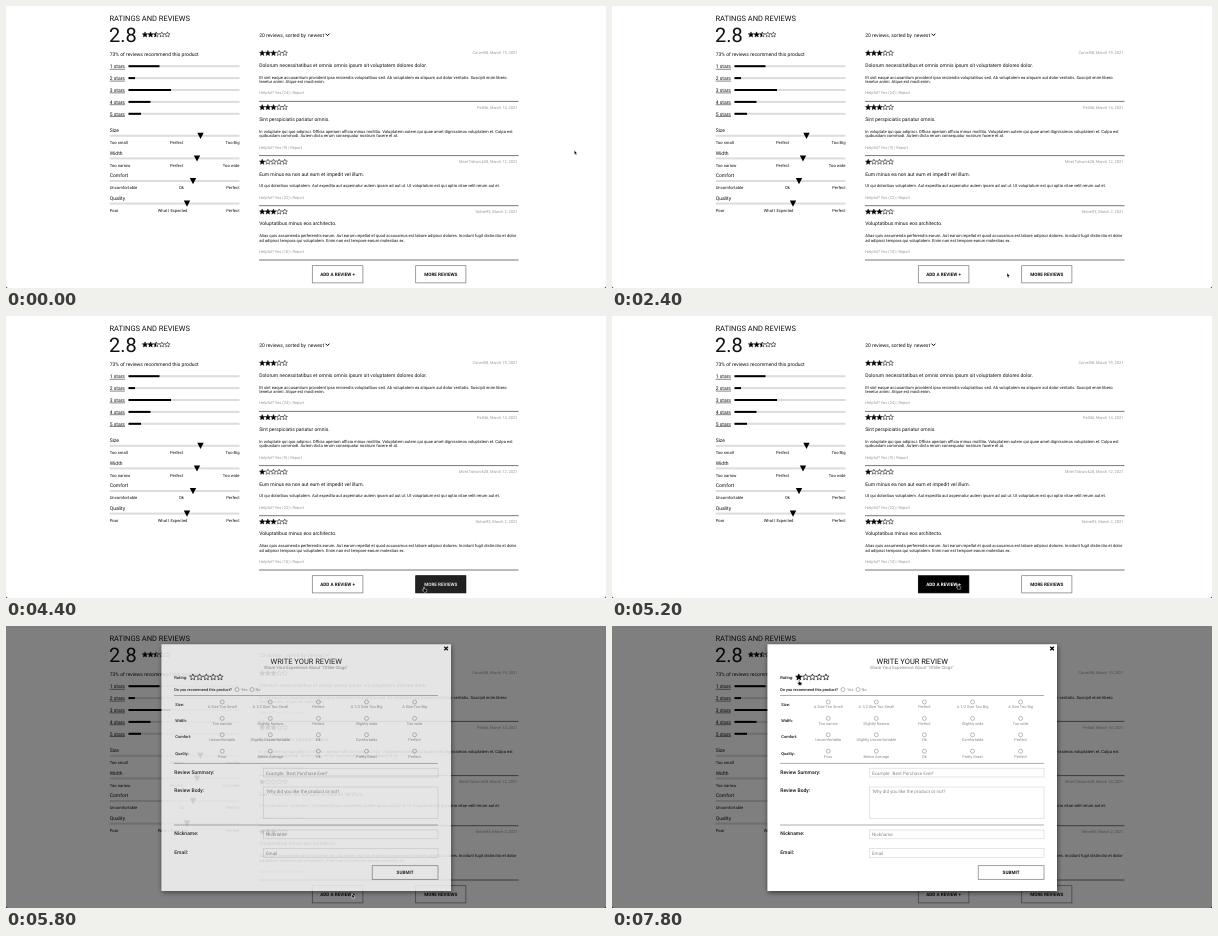
An HTML page that plays this animation: 600x282 px, repeating every 8000 ms.

```html
<!DOCTYPE html>
<html lang="en">
<head>
<meta charset="utf-8">
<title>Ratings and reviews</title>
<style>
html, body { margin: 0; width: 100%; height: 100%; overflow: hidden; background: #fff; }
svg { display: block; width: 100%; height: 100%; }
text { font-family: Roboto, "Liberation Sans", sans-serif; text-rendering: geometricPrecision; white-space: pre; }
</style>
</head>
<body>
<svg id="stage" viewBox="0 0 600 282" xmlns="http://www.w3.org/2000/svg">
  <defs>
    <filter id="shadow" x="-10%" y="-10%" width="120%" height="120%">
      <feDropShadow dx="0.5" dy="1.5" stdDeviation="2.5" flood-color="#000" flood-opacity="0.6"/>
    </filter>
  </defs>
  <g id="page"></g>
  <rect id="dim" width="600" height="282" fill="#000"/>
  <g id="modal"></g>
  <path d="M0 280.3V282H1.7Q.3 281.7 0 280.3ZM600 280.3V282H598.3Q599.7 281.7 600 280.3Z" fill="#111"/>
  <g id="cursor" stroke="#fff" stroke-width=".45" stroke-linejoin="round">
    <path id="arrow" d="M0 0V4.3L1 3.4L1.7 5L2.4 4.7L1.7 3.1H3.1Z"/>
    <path id="hand" d="M-.5 .2Q0 -.4 .5 .2V1.9L2.6 2.4Q3 2.6 2.9 3.2L2.4 5.2H-.1L-1.6 3.3Q-1.7 2.6 -1.1 2.7L-.5 3.2Z"/>
  </g>
</svg>
<script>
const LOOP = 8000, STEP = 200;
const $ = id => document.getElementById(id);
const page = $("page"), modal = $("modal");

function add(parent, tag, attrs, content) {
  const el = document.createElementNS("http://www.w3.org/2000/svg", tag);
  for (const key in attrs) el.setAttribute(key, attrs[key]);
  if (content) el.textContent = content;
  return parent.appendChild(el);
}

const text = (parent, x, y, size, content, extra) =>
  add(parent, "text", { x, y, "font-size": size, fill: "#111", ...extra }, content);
const rect = (parent, x, y, width, height, fill, extra) =>
  add(parent, "rect", { x, y, width, height, fill, ...extra });
const rule = (parent, x1, x2, y, stroke) =>
  add(parent, "line", { x1, x2, y1: y, y2: y, stroke, "stroke-width": 0.8 });

const END = { "text-anchor": "end" };
const MID = { "text-anchor": "middle" };
const SEMI = { "font-weight": 500 };

// Ten corners from the top, clockwise; the last five lie on the left half.
function starPath(cx, cy, r, leftOnly) {
  const points = [];
  for (let i = 0; i < 10; i++) {
    const a = i * Math.PI / 5, d = i % 2 ? r * 0.45 : r;
    if (!leftOnly || i === 0 || i >= 5)
      points.push((cx + d * Math.sin(a)).toFixed(2) + " " + (cy - d * Math.cos(a)).toFixed(2));
  }
  return "M" + points.join("L") + "Z";
}

function stars(parent, x, y, r, gap, score) {
  return [0, 1, 2, 3, 4].map(i => {
    const cx = x + i * gap;
    if (score - i === 0.5) add(parent, "path", { d: starPath(cx, y, r, true), fill: "#000" });
    return add(parent, "path", {
      d: starPath(cx, y, r), fill: score >= i + 1 ? "#000" : "none",
      stroke: "#000", "stroke-width": r > 3 ? 0.65 : 0.5, "stroke-linejoin": "round"
    });
  });
}

function button(parent, x, y, w, h, label) {
  const box = rect(parent, x, y, w, h, "#fff", { stroke: "#777", "stroke-width": 0.7 });
  const caption = text(parent, x + w / 2, y + h / 2 + 1.65, 4.62, label, { ...MID, "font-weight": 700 });
  return level => {
    const shade = Math.round(255 * (1 - level)), ink = Math.round(17 + 238 * level);
    box.setAttribute("fill", `rgb(${shade},${shade},${shade})`);
    box.setAttribute("stroke", level > 0.5 ? "#000" : "#777");
    caption.setAttribute("fill", `rgb(${ink},${ink},${ink})`);
  };
}

function buildSummary() {
  text(page, 103.5, 15.2, 7.5, "RATINGS AND REVIEWS");
  text(page, 103, 35.6, 20, "2.8");
  stars(page, 139, 28.7, 2.8, 5.6, 2.5);
  text(page, 103.7, 49.9, 5, "73% of reviews recommend this product");
  [31, 6.5, 42.5, 22, 12.5].forEach((width, i) => {
    const y = 60.2 + i * 11.9;
    text(page, 103.7, y + 1.7, 5, `${i + 1} stars`, { "text-decoration": "underline" });
    rect(page, 122.5, y - 1, 111, 2, "#dcdcdc");
    rect(page, 122.5, y - 1, width, 2, "#000");
  });
  [
    ["Size", 194.5, "Too small", 164, "Perfect", "Too Big"],
    ["Width", 191, "Too narrow", 164, "Perfect", "Too wide"],
    ["Comfort", 187, "Uncomfortable", 173, "Ok", "Perfect"],
    ["Quality", 181, "Poor", 151.7, "What I Expected", "Perfect"]
  ].forEach(([name, mark, low, midX, mid, high], i) => {
    const y = 129.8 + i * 22.6;
    text(page, 103.7, y - 3.8, 5, name);
    rect(page, 103.7, y - 1, 129.8, 2, "#dcdcdc");
    add(page, "path", { d: `M${mark - 3.2} ${y - 3}h6.4l-3.2 6.2Z`, fill: "#000" });
    text(page, 103.7, y + 8.2, 4.15, low);
    text(page, midX, y + 8.2, 4.15, mid);
    text(page, 233.5, y + 8.2, 4.15, high, END);
  });
}

const reviews = [
  [47, 3, "Corvel58, March 19, 2021", 24, "Dolorum necessitatibus et omnis omnis ipsum sit voluptatem dolores dolor.",
    "Et sint eaque accusantium provident ipsa reiciendis voluptatibus sed. Ab voluptatem ea aliquam aut dolor veritatis. Suscipit enim libero",
    "tenetur animi. Atque est modi enim."],
  [101.2, 3, "Pell46, March 14, 2021", 9, "Sint perspiciatis pariatur omnis.",
    "In voluptate qui quo adipisci. Officia aperiam officia minus mollitia. Voluptatem autem qui quae amet dignissimos voluptatem et. Culpa est",
    "quibusdam commodi. Autem dicta rerum consequatur nostrum facere et at."],
  [155.8, 1, "Mirel.Tobwick28, March 12, 2021", 22, "Eum minus ea non aut eum et impedit vel illum.",
    "Ut qui doloribus voluptatem. Aut expedita aut aspernatur autem ipsam ad aut ut. Ut voluptatum est qui optio vitae velit rerum aut et."],
  [205.6, 3, "Selvie93, March 2, 2021", 10, "Voluptatibus minus eos architecto.",
    "Alias quis assumenda perferendis earum. Aut earum repellat et quod accusamus est labore adipisci dolores. Incidunt fugit distinctio et dolor",
    "ad adipisci tempora qui voluptatem. Enim non est tempore earum molestias ex."]
];

function buildReviews() {
  text(page, 253.2, 30.8, 5, "20 reviews, sorted by");
  text(page, 302, 30.8, 5, "newest");
  add(page, "path", { d: "M319.6 27.7L321.5 29.7L323.4 27.7", fill: "none", stroke: "#000", "stroke-width": 1 });
  reviews.forEach(([y, score, byline, votes, title, ...lines]) => {
    stars(page, 256.2, y + 0.2, 2.8, 5.65, score);
    text(page, 511.5, y + 1.3, 4, byline, { ...END, fill: "#999" });
    text(page, 253.2, y + 13.7, 5, title);
    lines.forEach((line, i) => text(page, 253.2, y + 25.6 + i * 4.6, 4.15, line));
    const foot = y + 36.9 + (lines.length - 1) * 4.5;
    text(page, 253.2, foot, 4, `Helpful? Yes (${votes}) | Report`, { fill: "#999" });
    rule(page, 253, 512.5, foot + 7, "#555");
  });
}

function radio(x, y) {
  add(modal, "circle", { cx: x, cy: y, r: 2, fill: "#fff", stroke: "#777", "stroke-width": 0.5 });
}

function field(y, h, label, hint) {
  text(modal, 168.3, y + 5.3, 5, label, SEMI);
  rect(modal, 257.6, y, 174.4, h, "#fff", { stroke: "#d4d4d4", "stroke-width": 0.6 });
  text(modal, 260, y + 6.4, 4.6, hint, { fill: "#888" });
}

function buildModal() {
  const grey = { fill: "#888" };
  rect(modal, 155.5, 18.3, 289.5, 246.7, "#fff", { filter: "url(#shadow)" });
  add(modal, "path", { d: "M438.3 20.7l3.6 3.6m0-3.6l-3.6 3.6", stroke: "#000", "stroke-width": 1.3 });
  text(modal, 300.2, 37.7, 7.5, "WRITE YOUR REVIEW", MID);
  text(modal, 300, 43.4, 4.4, "Share Your Experience About \"Ottilie Clogs\"", { ...MID, ...grey });
  text(modal, 168.3, 52.5, 4.1, "Rating:", SEMI);
  const rating = stars(modal, 186.8, 51.2, 3.3, 6.8, 0);
  text(modal, 168.3, 65, 3.9, "Do you recommend this product?", SEMI);
  radio(231, 63.5);
  text(modal, 235, 65, 4, "Yes", grey);
  radio(246, 63.5);
  text(modal, 249.5, 65, 4, "No", grey);
  rule(modal, 168, 432, 69.5, "#999");
  [
    ["Size:", "A Size Too Small", "A 1/2 Size Too Small", "Perfect", "A 1/2 Size Too Big", "A Size Too Big"],
    ["Width:", "Too narrow", "Slightly Narrow", "Perfect", "Slightly wide", "Too wide"],
    ["Comfort:", "Uncomfortable", "Slightly Uncomfortable", "Ok", "Comfortable", "Perfect"],
    ["Quality:", "Poor", "Below Average", "Ok", "Pretty Great", "Perfect"]
  ].forEach(([name, ...options], row) => {
    const y = 76 + row * 16.4;
    text(modal, 169.3, y + 3.6, 4, name, SEMI);
    options.forEach((option, i) => {
      const x = 216.2 + i * 48.1;
      radio(x, y);
      text(modal, x, y + 6.3, 3.9, option, { ...MID, ...grey });
    });
  });
  rule(modal, 168, 432, 137.4, "#999");
  field(142.2, 8.8, "Review Summary:", "Example: 'Best Purchase Ever!'");
  field(161, 31.5, "Review Body:", "'Why did you like the product or not?");
  rule(modal, 168, 432, 199, "#999");
  field(204, 8.8, "Nickname:", "Nickname");
  field(222.6, 8.8, "Email:", "Email");
  button(modal, 366.2, 239.7, 65.8, 13.6, "SUBMIT");
  return rating[0];
}

buildSummary();
buildReviews();
const shadeAdd = button(page, 306.3, 259.7, 50.6, 17.2, "ADD A REVIEW +");
const shadeMore = button(page, 409.7, 259.7, 50.2, 17.2, "MORE REVIEWS");
const firstStar = buildModal();

// Pointer moves: first step, last step, destination.
const moves = [
  [1000, 2000, 430, 267], [2200, 2400, 395, 267], [3000, 4000, 346, 268],
  [4200, 4400, 418, 271], [4600, 5200, 346, 268],
  [6400, 7400, 195, 59.5], [7600, 7800, 187, 54]
];

const ramp = (t, a, b) => Math.min(1, Math.max(0, (t - a) / (b - a)));
const ease = p => p * p * (3 - 2 * p);

function pointer(t) {
  let x = 568.3, y = 144.3;
  for (const [from, to, tx, ty] of moves) {
    const p = ease(ramp(t, from - STEP, to));
    x += (tx - x) * p;
    y += (ty - y) * p;
  }
  return [x, y];
}

function draw(now) {
  const t = Math.floor(now % LOOP / STEP) * STEP;
  const [x, y] = pointer(t);
  shadeAdd(ramp(t, 3400, 3800) - ramp(t, 4000, 4400) + ramp(t, 4800, 5200) - ramp(t, 5450, 5650));
  shadeMore(ramp(t, 4200, 4430) - ramp(t, 4600, 4900));

  $("dim").setAttribute("opacity", 0.5 * ramp(t, 5400, 5620));
  modal.setAttribute("opacity", t < 5600 ? 0 : t < 5800 ? 0.16 : t < 6000 ? 0.8 : 1);
  firstStar.setAttribute("fill", t >= 7600 ? "#000" : "none");

  const overButton = t >= 3000 && t < 5600 && (x < 357 || x > 409);
  const hand = overButton || t >= 7600;
  $("cursor").setAttribute("transform", `translate(${x.toFixed(2)} ${y.toFixed(2)})`);
  $("hand").setAttribute("visibility", hand ? "visible" : "hidden");
  $("arrow").setAttribute("visibility", hand ? "hidden" : "visible");
}

const start = performance.now();
function tick() {
  draw(performance.now() - start);
  requestAnimationFrame(tick);
}
tick();
</script>
</body>
</html>
```
